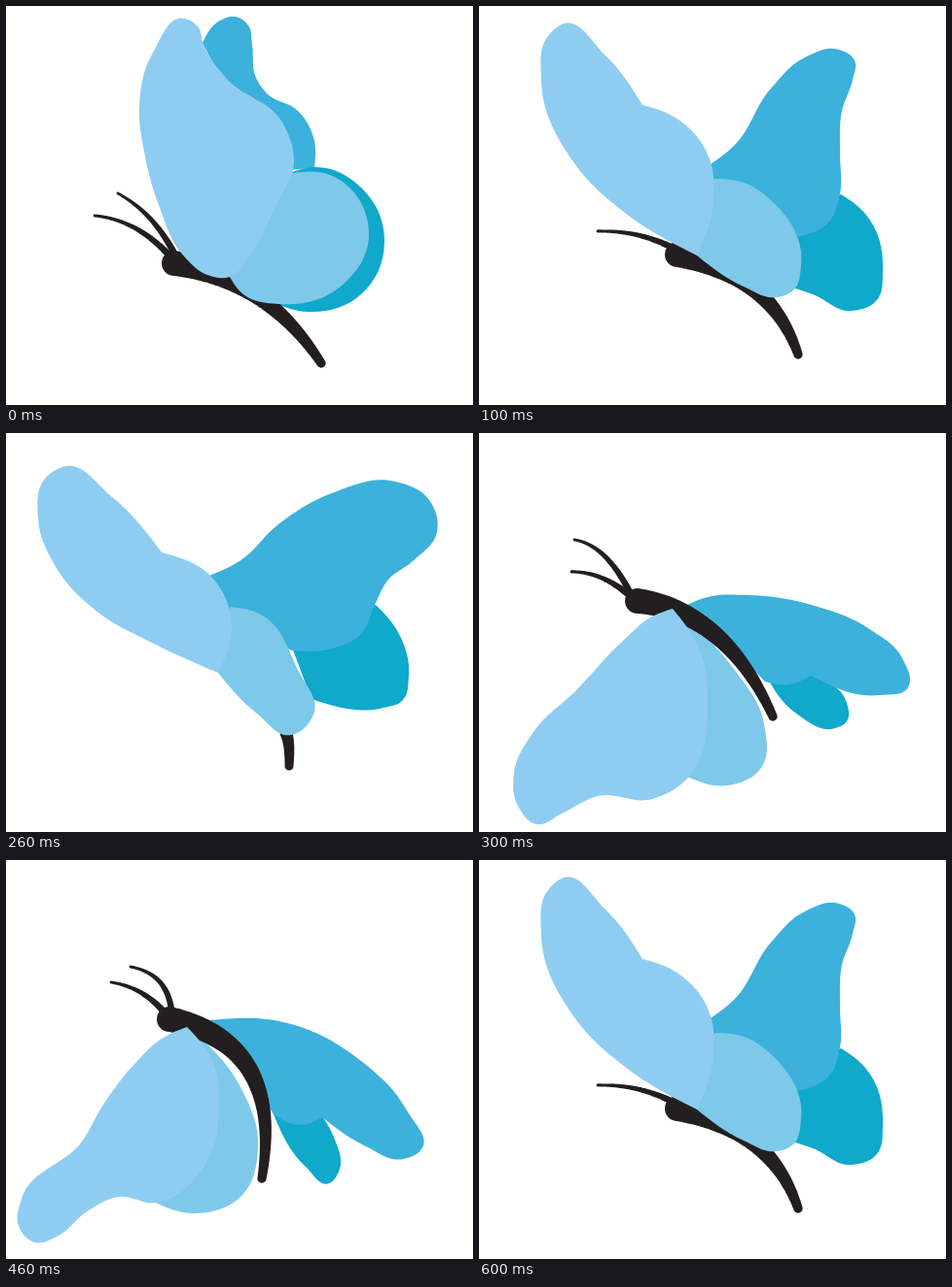
An HTML page with a canvas that plays this animation: 480 by 411 pixels, repeating every 0.7 s.

```html
<!DOCTYPE html>
<html lang="en">
<head>
<meta charset="utf-8">
<title>Butterfly</title>
<style>
  html, body { margin: 0; height: 100%; overflow: hidden; background: #fff; }
  canvas { display: block; width: 100vw; height: 100vh; }
</style>
</head>
<body>
<canvas width="480" height="411"></canvas>
<script>
  const ctx = document.querySelector('canvas').getContext('2d');
  const dark = '#231f20';

  const parse = text => text.split(' ').map(word => {
    const [x, y] = word.split(',').map(parseFloat);
    return { x, y, corner: word.endsWith('!') };
  });
  const dist = (a, b) => Math.hypot(b.x - a.x, b.y - a.y);
  const mid = (a, b) => ({ x: (a.x + b.x) / 2, y: (a.y + b.y) / 2 });

  // Handle leaving b along the curve a-b-c; a negative length points back.
  function handle(a, b, c, length) {
    const k = dist(b, c) / dist(a, b);
    const dx = (b.x - a.x) * k + (c.x - b.x) / k;
    const dy = (b.y - a.y) * k + (c.y - b.y) / k;
    const s = length / Math.hypot(dx, dy);
    return { x: b.x + dx * s, y: b.y + dy * s };
  }

  // Smooth closed outline through the points; "!" marks a sharp corner.
  function wing(color, text) {
    const pts = parse(text), n = pts.length;
    ctx.fillStyle = color;
    ctx.beginPath();
    ctx.moveTo(pts[0].x, pts[0].y);
    pts.forEach((p, i) => {
      const before = pts[(i + n - 1) % n], q = pts[(i + 1) % n], after = pts[(i + 2) % n];
      const reach = dist(p, q) * 0.36;
      let c1 = p.corner ? null : handle(before, p, q, reach);
      let c2 = q.corner ? null : handle(p, q, after, -reach);
      c1 = c1 || mid(p, c2 || q);
      c2 = c2 || mid(q, c1);
      ctx.bezierCurveTo(c1.x, c1.y, c2.x, c2.y, q.x, q.y);
    });
    ctx.fill();
  }
  const farTop = text => wing('#3bb1dc', text);
  const farLow = text => wing('#10a8cb', text);
  const nearTop = text => wing('#8ecdf1', text);
  const nearLow = text => wing('#7ec8ea', text);

  // Tapered stroke along a quadratic curve.
  function limb(path, r0, r1) {
    const [a, b, c] = parse(path);
    ctx.fillStyle = dark;
    ctx.beginPath();
    for (let t = 0; t <= 1; t += 1 / 128) {
      const u = 1 - t;
      const x = u * u * a.x + 2 * u * t * b.x + t * t * c.x;
      const y = u * u * a.y + 2 * u * t * b.y + t * t * c.y;
      const r = r0 + (r1 - r0) * t;
      ctx.moveTo(x + r, y);
      ctx.arc(x, y, r, 0, 2 * Math.PI);
    }
    ctx.fill();
  }
  const trunk = path => limb(path, 13, 4.7);
  const feeler = path => limb(path, 1.4, 3.3);

  function raised() {
    farTop('202,38! 220,15 236,11 249,20 253,40 257,74 268,90 300,108 316,135 317,167! 270,170!');
    farLow('294,171! 318,166 366,188 389,243 365,297 310,315 276,306!');
    trunk('173,265 267,280 324,368');
    feeler('115,193 150,212 172,253');
    feeler('91,216 133,220 166,255');
    nearLow('294,172! 333,174 373,237 345,288 280,307 244,297 230,279! 255,225!');
    nearTop('184,13 197,21 203,40 226,74 284,120 296,161 277,206 250,258 230,279 207,277 184,259 157,205 142,150 137,108 151,48');
  }

  function opening() {
    farLow('372,194! 397,214 415,272 408,304 383,314 343,297 322,290! 310,220!');
    farTop('238,163! 262,144 300,85 335,53 370,45 386,56 384,76 373,108 371,150 371,193 360,222 327,238! 240,200!');
    trunk('204,256 300,276 328,359');
    feeler('122,232 162,231 197,248');
    nearLow('243,178! 272,182 300,200 331,268 323,293 305,300 272,289 224,257! 225,190!');
    nearTop('85,19 130,51 168,102! 205,117 236,155 241,200 224,257! 150,213 98,162 64,76 71,31');
  }

  function spread() {
    farLow('380,177! 405,209 414,250 407,276 388,283 314,274! 290,210!');
    farTop('209,147! 240,132 280,94 335,62 400,50 435,69 443,102 418,132 393,151 379,177 364,208 335,222 294,224! 225,190!');
    limb('288,309 292,320 291,343', 6.5, 4.5);
    nearLow('231,179! 260,186 300,244 316,290 293,311 258,289 218,247! 220,200!');
    nearTop('58,35 109,66 160,123! 212,149 232,199 218,247! 150,216 95,185 50,136 33,88 41,46');
  }

  function lowered() {
    farLow('295,250! 325,288 366,304 378,297 378,278 356,254! 320,240!');
    farTop('212,178! 235,169 275,167 345,178 403,203 435,232 441,262 412,270 341,250! 318,259 294,256! 240,200!');
    nearLow('200,182! 262,243 293,300 290,345 255,363 214,354!');
    trunk('163,173 254,184 302,292');
    feeler('98,110 130,115 155,164');
    feeler('95,143 125,143 152,165');
    nearTop('199,181! 226,222 235,280 214,356 178,377 122,374 85,392 59,403 41,386 36,350 56,308 100,265 148,214 178,189');
  }

  function lowest() {
    farLow('275,262! 308,316 332,333 343,318 338,288 325,264! 290,240!');
    farTop('210,165! 275,165 365,207 412,258 427,298 408,308 370,295 325,265! 304,273 275,262! 230,190!');
    nearLow('187,172! 240,232 259,297 243,345 195,364 150,351!');
    trunk('168,164 286,188 263,328');
    feeler('128,110 165,117 170,154');
    feeler('108,126 140,131 161,155');
    nearTop('186,172! 212,207 219,252 202,318 155,353 115,347 82,363 52,388 30,394 13,377 16,349 78,290 100,252 135,207 160,184');
  }

  function rising() {
    farLow('278,225! 325,230 393,247! 423,283 427,313 400,320 355,281 300,245!');
    farTop('256,216! 272,195 315,176 400,160 451,173 473,206 445,225 410,227 400,240 385,249 340,236 278,225!');
    trunk('232,223 316,222 357,333');
    feeler('165,163 205,180 236,213');
    feeler('141,190 185,191 225,214');
    nearLow('160,328! 210,265! 270,232! 283,253! 269,268 272,290 288,340 276,384 245,398 205,383');
    nearTop('150,220 222,219 278,239! 225,262 190,294 160,328! 130,331 105,318! 55,322 19,307 5,281 40,240');
  }

  const cycle = [raised, opening, spread, lowered, lowest, rising, opening];
  const hold = 100;

  function draw() {
    ctx.clearRect(0, 0, 480, 411);
    cycle[Math.floor(performance.now() / hold) % cycle.length]();
    requestAnimationFrame(draw);
  }
  draw();
</script>
</body>
</html>
```
